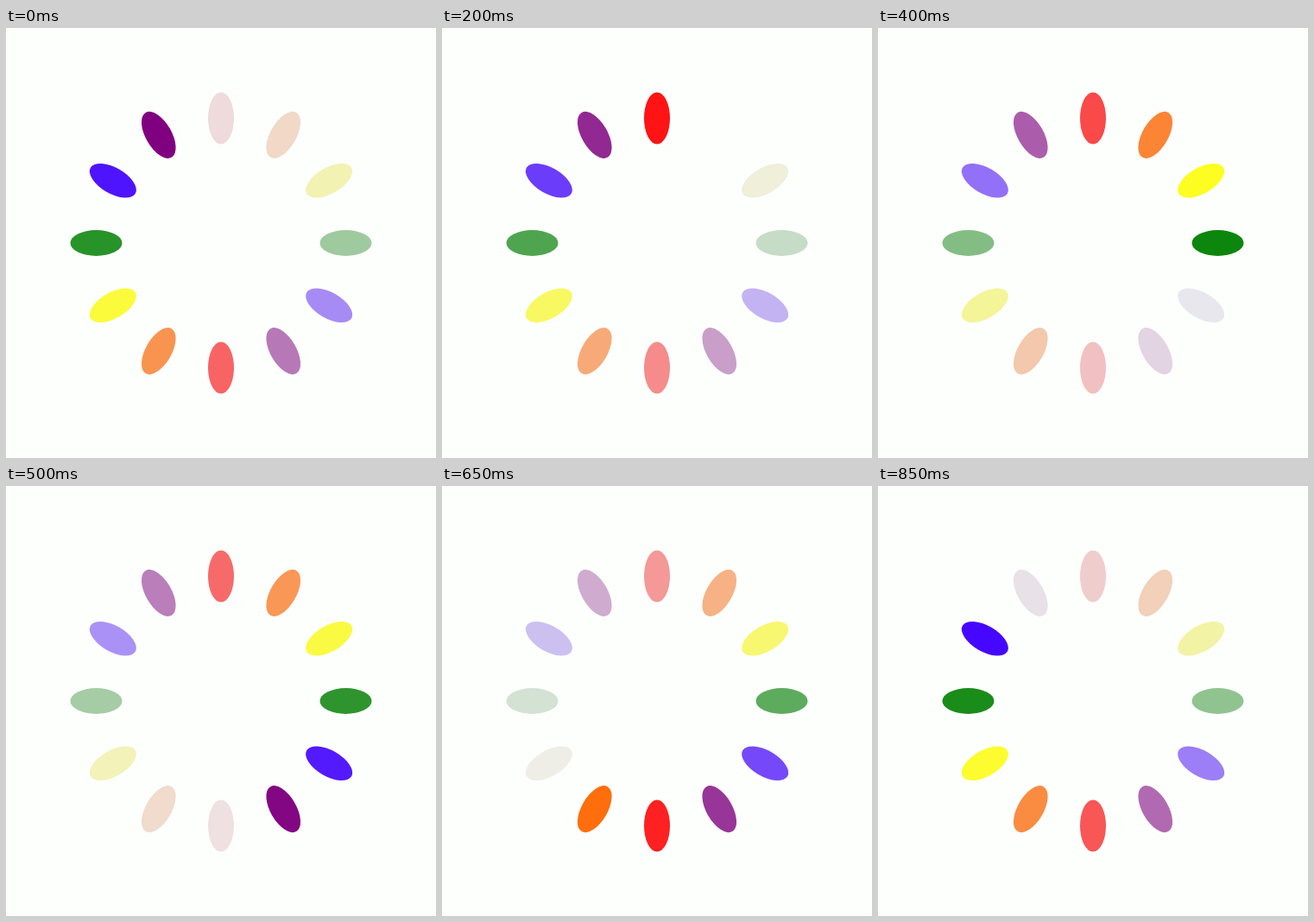
Recreate the animation shown at these times as an HTML page with a canvas. Size 498 by 498 pixels, loop 0.9 s.

```html
<!DOCTYPE html>
<html>
<head>
<meta charset="utf-8">
<style>
  html, body { margin: 0; width: 100%; height: 100%; overflow: hidden; background: #fdfffd; }
  canvas { display: block; }
</style>
</head>
<body>
<canvas width="498" height="498"></canvas>
<script>
const ctx = document.querySelector('canvas').getContext('2d');
const COUNT = 12, STEP = 50, STEPS = 18, PALE = 238;
const colors = [[255, 0, 0], [255, 102, 0], [255, 255, 0], [0, 128, 0], [64, 0, 255], [128, 0, 128]];

// [step, index of the petal that lights up]
const knots = [[0, -0.97], [4, 1], [8, 11 / 3], [12, 7], [18, 11]];

function headAt(step) {
  const k = knots.findIndex(([s]) => s > step);
  const [s0, h0] = knots[k - 1], [s1, h1] = knots[k];
  return h0 + (h1 - h0) * (step - s0) / (s1 - s0);
}

function drawPetal(i, head) {
  const age = (head - i + 2 * COUNT) % COUNT;
  // A petal blinks off at the instant its cycle restarts.
  if (age < 0.01 || age > COUNT - 0.01) return;
  const fade = age / COUNT;
  const rgb = colors[i % colors.length].map(c => Math.round(c + (PALE - c) * fade));
  ctx.save();
  ctx.translate(249, 249);
  ctx.rotate(i * 2 * Math.PI / COUNT);
  ctx.fillStyle = `rgb(${rgb})`;
  ctx.beginPath();
  ctx.ellipse(0, -144.5, 15, 30, 0, 0, 2 * Math.PI);
  ctx.fill();
  ctx.restore();
}

function draw() {
  const head = headAt(Math.floor(performance.now() / STEP) % STEPS);
  ctx.fillStyle = '#fdfffd';
  ctx.fillRect(0, 0, 498, 498);
  for (let i = 0; i < COUNT; i++) drawPetal(i, head);
  requestAnimationFrame(draw);
}
draw();
</script>
</body>
</html>
```
